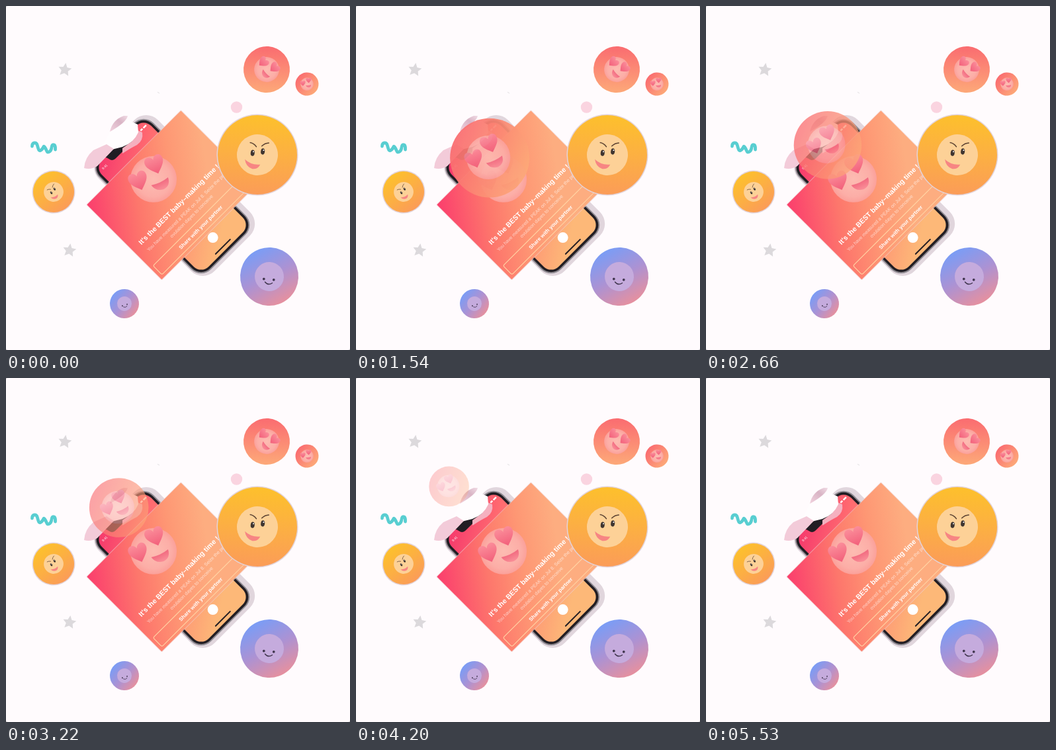
Recreate the animation shown at these times as an HTML page. Size 520x520 px, loop 5600 ms.

```html
<!DOCTYPE html>
<html lang="en">
<head>
<meta charset="utf-8">
<title>Floating moods</title>
<style>
  html, body { margin: 0; width: 100%; height: 100%; overflow: hidden; background: #c9c5c8; }
  svg { display: block; width: 100vw; height: 100vh; }
  text { font-family: "Liberation Sans", Arial, sans-serif; fill: #fff; text-anchor: middle; }
</style>
</head>
<body>
<svg viewBox="0 0 520 520">
  <defs>
    <linearGradient id="rose" x1=".25" y1=".05" x2=".7" y2="1">
      <stop offset="0" stop-color="#fa6b70"/><stop offset="1" stop-color="#fdab79"/>
    </linearGradient>
    <linearGradient id="gold" x1=".5" y1="0" x2=".55" y2="1">
      <stop offset="0" stop-color="#fdc02c"/><stop offset=".5" stop-color="#fcaf43"/><stop offset="1" stop-color="#fb9c58"/>
    </linearGradient>
    <linearGradient id="dusk" x1=".15" y1=".1" x2=".7" y2="1">
      <stop offset="0" stop-color="#789df7"/><stop offset=".5" stop-color="#ac92d3"/><stop offset="1" stop-color="#e9909c"/>
    </linearGradient>
    <linearGradient id="card" gradientUnits="userSpaceOnUse" x1="-100" y1="-80" x2="50" y2="30">
      <stop offset="0" stop-color="#fb3f6d"/><stop offset=".4" stop-color="#fd776c"/><stop offset=".7" stop-color="#fe9774"/><stop offset="1" stop-color="#fdad80"/>
    </linearGradient>
    <linearGradient id="screen" x1="0" y1="0" x2=".3" y2="1">
      <stop offset="0" stop-color="#f5366c"/><stop offset=".35" stop-color="#ff6b70"/><stop offset="1" stop-color="#fdb878"/>
    </linearGradient>
    <linearGradient id="strip" x1="0" y1="1" x2="1" y2="0">
      <stop offset="0" stop-color="#f2d3df"/><stop offset=".6" stop-color="#d9b4c5"/><stop offset="1" stop-color="#f1dce5"/>
    </linearGradient>
    <linearGradient id="lip" x1="0" y1="0" x2="0" y2="1">
      <stop offset="0" stop-color="#f1687f"/><stop offset="1" stop-color="#fa8f98"/>
    </linearGradient>
    <linearGradient id="ruby" x1="0" y1="0" x2="0" y2="1">
      <stop offset="0" stop-color="#fb8d9a"/><stop offset="1" stop-color="#f25f7a"/>
    </linearGradient>
    <radialGradient id="blush">
      <stop offset="0" stop-color="#fdbcb2"/><stop offset=".75" stop-color="#fcaea7"/><stop offset="1" stop-color="#fba09a"/>
    </radialGradient>
    <path id="heart" d="M0 14C-5 9-13 3-13-4C-13-13-3-14 0-6C3-14 13-13 13-4C13 3 5 9 0 14Z" fill="url(#ruby)"/>
    <path id="star" d="M0-10L3-3.5L10-3L5 2L6.5 9L0 5.5L-6.5 9L-5 2L-10-3L-3-3.5Z" fill="#dcd9dc"/>
    <g id="love">
      <circle r="35" fill="url(#blush)"/>
      <use href="#heart" transform="translate(-17.5 -15) rotate(24) scale(1.1)"/>
      <use href="#heart" transform="translate(17.5 -15) rotate(24) scale(1.1)"/>
      <path d="M-14-3Q0 0 14-4Q13 9 1 10Q-11 9-14-3Z" transform="translate(3 12) rotate(22)" fill="url(#lip)"/>
    </g>
    <g id="sly">
      <circle r="31" fill="#fdd197"/>
      <ellipse cx="-7.5" cy="-2" rx="3" ry="4.700" fill="#3f3530"/>
      <ellipse cx="7.5" cy="-6" rx="3" ry="4.700" fill="#3f3530"/>
      <circle cx="-6.5" cy="-4" r="1" fill="#fff"/><circle cx="8.5" cy="-8" r="1" fill="#fff"/>
      <path d="M-13-17Q-8-17-3-12M5-14Q9-19 15-20" fill="none" stroke="#5a4030" stroke-width="1.400" stroke-linecap="round"/>
      <path d="M-18 9Q-7 17 6 14Q3 22-5 22Q-15 20-18 9Z" fill="#f78583"/>
    </g>
    <g id="calm">
      <circle r="22" fill="#c5abdd"/>
      <circle cx="-8" cy="4" r="1.900" fill="#41364f"/><circle cx="7" cy="4.500" r="1.900" fill="#41364f"/>
      <path d="M-6 8.500Q-1 14 5 9.500" fill="none" stroke="#41364f" stroke-width="1.500" stroke-linecap="round"/>
    </g>
  </defs>

  <rect width="520" height="520" rx="3" fill="#fffbfd"/>
  <use href="#star" transform="translate(89 96) rotate(8)"/>
  <use href="#star" transform="translate(96 369) rotate(8)"/>
  <circle cx="348.500" cy="153" r="8.700" fill="#fad4e0"/>
  <path d="M229 130l3 2" stroke="#e3dfe2"/>
  <path d="M39.500 212C39 206 46 205 47.500 211S50 221 54 217S56 210 59 214S61 223 66 220S67 208 73 210Q75 212 74.500 217" fill="none" stroke="#58ced1" stroke-width="4.800" stroke-linecap="round"/>

  <g transform="translate(251.500 287.500) rotate(-45)">
    <rect x="-60" y="-122" width="126" height="247" rx="25" fill="#e1d6dd"/>
    <rect x="-58" y="-119.500" width="116" height="239" rx="21" fill="#8f8a91"/>
    <rect x="-56" y="-117.500" width="112" height="235" rx="19" fill="#211d23"/>
    <rect x="-52.500" y="-114" width="105" height="228" rx="16" fill="url(#screen)"/>
    <path d="M-32-115H32Q29-113 28-108Q27-101 20-101H-20Q-27-101-28-108Q-29-113-32-115Z" fill="#211d23"/>
    <text x="-41" y="-102" font-size="5">9:41</text>
    <path d="M36-104h4M42-104h6" stroke="#fff" stroke-width="2.500"/>
    <circle cx="-1" cy="87.500" r="8" fill="#fff"/>
    <path d="M-15.500 108H15.500" stroke="#211d23" stroke-width="2" stroke-linecap="round"/>
  </g>

  <path d="M176 215L190 205L199 188L206 191Q208 203 198 210Q188 215 176 223Z" fill="#f5b0bf"/>
  <path d="M144 216L157 190L184 172L199 179L200 191Q193 207 176 213L160 217Z" fill="#fffdfe"/>
  <path d="M118 245Q119 229 132 218L152 209L163 216L138 242Q128 248 118 245Z" fill="#f3cbd9"/>
  <path d="M157 190Q161 172 178 166H184Q182 176 157 190Z" fill="url(#strip)"/>

  <g transform="translate(252 288) rotate(-45)">
    <rect x="-101.500" y="-84" width="203" height="162" rx="2" fill="#efcfce" opacity=".6"/>
    <rect x="-100.500" y="-83" width="201" height="160" rx="1" fill="url(#card)"/>
    <use href="#love" x="-2" y="-39"/>
    <text x="-2" y="18.500" font-size="10.600" font-weight="700">It's the BEST baby–making time !</text>
    <g opacity=".65">
      <text x="-1" y="33.500" font-size="7.200">You have measured a PEAK on Jul 8. Seize the pre-</text>
      <text x="-1" y="43.500" font-size="7.200">ovulation dayes to conceive</text>
    </g>
    <rect x="-95" y="53" width="190" height="19" rx="2.500" fill="none" stroke="#ffd9a8"/>
    <text x="-3" y="65.500" font-size="8" font-weight="700">Share with your partner</text>
  </g>

  <g id="balls"></g>

  <g id="flyer">
    <g transform="rotate(-45)">
      <circle r="63.300" fill="url(#rose)"/>
      <use href="#love" x="-1" y="-2"/>
    </g>
  </g>
</svg>
<script>
  const $ = id => document.getElementById(id);

  // x, y, radius, fill, face, face scale, turn
  const balls = [
    [394, 96, 35, "rose", "love", .54, 27],
    [455, 118, 17.5, "rose", "love", .28, -27],
    [380, 225, 60, "gold", "sly", 1, 7],
    [72, 281, 31, "gold", "sly", .48, -35],
    [398, 409, 44, "dusk", "calm", 1, 3],
    [179, 450, 22, "dusk", "calm", .5, -20]
  ];
  $("balls").innerHTML = balls.map(([x, y, r, fill, face, size, turn]) => `
    <g transform="translate(${x} ${y}) rotate(${turn})">
      ${fill === "gold" ? `<circle r="${r + 1.5}" fill="#e3d3d9"/>` : ""}
      <circle r="${r}" fill="url(#${fill})"/>
      <use href="#${face}" transform="scale(${size})"/>
    </g>`).join("");

  const LOOP = 5600, STEP = 70;
  const START = 300, END = 5040;
  const clamp = v => Math.min(1, Math.max(0, v));

  function draw(t) {
    const p = clamp((t - START) / (END - START)) ** 2;
    const x = 209 - 101 * p, y = 237 - 108 * p;
    $("flyer").setAttribute("transform", `translate(${x} ${y}) scale(${1 - .77 * p})`);
    $("flyer").setAttribute("opacity", clamp(t / 420) * (1 - p));
  }

  const begin = performance.now();
  function tick() {
    const t = (performance.now() - begin) % LOOP;
    draw(Math.floor(t / STEP) * STEP);
    requestAnimationFrame(tick);
  }
  tick();
</script>
</body>
</html>
```
